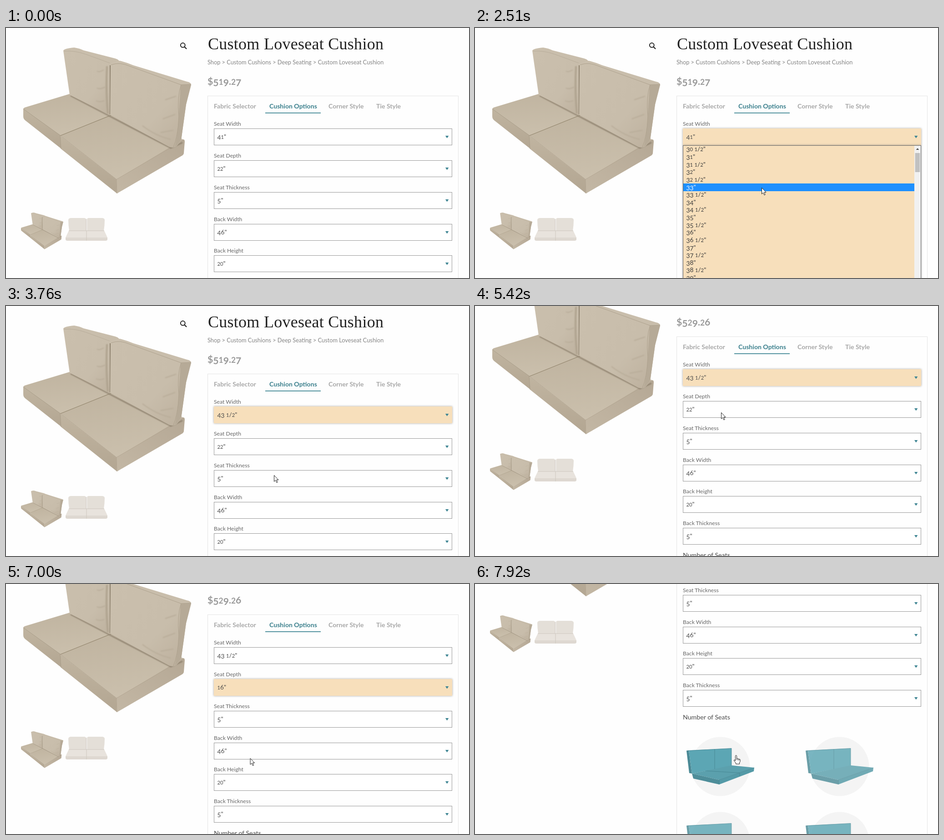
An HTML page that plays this animation: 1018x550 px, repeating every 7.99 s.

```html
<!DOCTYPE html>
<html lang="en">
<head>
<meta charset="utf-8">
<title>Custom Loveseat Cushion</title>
<style>
  html, body { margin: 0; width: 100%; height: 100%; overflow: hidden; background: #fefefe; }
  svg { display: block; }
  text { font-family: Lato, "Open Sans", sans-serif; fill: #4a4a4a; white-space: pre; }
  .title { font: 36px "Liberation Serif", "Times New Roman", serif; letter-spacing: .27px; fill: #222; }
  .crumb { font-size: 12.75px; fill: #858585; }
  .price { font-size: 21.2px; font-weight: 700; fill: #999; }
  .tab { font-size: 14.1px; font-weight: 700; fill: #a8a8a8; }
  .tab.on { fill: #3a7f8c; }
  .label { font-size: 12.2px; fill: #666; }
  .head { font-size: 14.2px; }
  .value, .row { font-size: 13.7px; }
  .row { fill: #3a3a3a; }
  .row.on { fill: #fff; }
  .low { font-size: .82em; }
  .drop { baseline-shift: -.15em; }
  .glow { filter: drop-shadow(0 0 2px #777a); }
  .soft { filter: blur(1.2px); }
</style>
</head>
<body>
<svg id="stage" width="1018" height="550" viewBox="0 0 1018 550">
  <defs>
    <linearGradient id="back" x1="0" y1="0" x2="1" y2="1">
      <stop offset="0" stop-color="#cabfad"/><stop offset=".6" stop-color="#c8bdab"/><stop offset="1" stop-color="#bbae9b"/>
    </linearGradient>
    <linearGradient id="seat" x1="0" y1="0" x2=".3" y2="1">
      <stop offset="0" stop-color="#bfb39f"/><stop offset="1" stop-color="#cabfac"/>
    </linearGradient>
    <linearGradient id="edge" x1="0" y1="0" x2="0" y2="1">
      <stop offset="0" stop-color="#c0b4a0"/><stop offset="1" stop-color="#b3a692"/>
    </linearGradient>
    <linearGradient id="front" x1="0" y1="1" x2="1" y2="0">
      <stop offset="0" stop-color="#c3b7a4"/><stop offset="1" stop-color="#b5a895"/>
    </linearGradient>
  </defs>
  <g id="page"></g>
  <g id="arrow"><path d="M.5.5V14.2L3.7 11.3 6 16.6 8.1 15.7 5.9 10.5H10Z" fill="#fff" stroke="#222" stroke-linejoin="round"/></g>
  <g id="hand"><path d="M-1.5 12V1.6Q-1.5 0 0 0T1.5 1.6V7Q3.4 5.8 4.3 7.6 6 6.6 6.8 8.3 9 7.8 9 10V13.5L7.6 16V19H-.3V17L-4.6 11.6Q-4.8 9.2-2.6 10.2Z" fill="#fff" stroke="#222" stroke-linejoin="round"/><path d="M1.5 7V10M4.3 8V11M6.8 8.5V11" fill="none" stroke="#222"/></g>
</svg>
<script>
const LOOP = 7990, PITCH = 69.85, ROW = 16.62;
const $ = id => document.getElementById(id);
const boxTop = i => Math.round(222 + PITCH * i) - .5;
const size = v => Math.floor(v) + (v % 1 ? ' 1/2' : '') + '"';

// old-style figures: 0-2 small, 3 4 5 7 9 below the line
const figures = s => s.replace(/[0-579]/g, d =>
  `<tspan class="${d < 3 ? 'low' : 'drop'}">${d}</tspan>`);
const text = (x, y, cls, s, id = '') =>
  `<text x="${x}" y="${y}" class="${cls}" id="${id}">${figures(s)}</text>`;
const rect = (x, y, w, h, fill, more = '') =>
  `<rect x="${x}" y="${y}" width="${w}" height="${h}" fill="${fill}" ${more}/>`;
const path = (d, fill, more = '') => `<path d="${d}" fill="${fill}" ${more}/>`;
const line = (d, color, w = 1, cls = '') =>
  path(d, 'none', `stroke="${color}" stroke-width="${w}" class="${cls}"`);

function sofa() {
  return '<g id="sofa" stroke-linejoin="round">' +
    path('M38 178Q39 175 44 174L140 145 235 192 119 238Z', 'url(#seat)') +
    path('M38 178L119 236 122 266 42 203Q38 200 38 194Z', 'url(#edge)') +
    path('M119 237L229 191 392 246 243 333Z', 'url(#seat)') +
    path('M119 237L243 333 244 364 121 266Z', 'url(#edge)') +
    path('M243 333L386 247Q393 243 393 250L391 275Q391 279 385 282L244 364Z', 'url(#front)') +
    line('M119 237L231 192', '#94876f', 1.3) +
    line('M38 178L119 236 121 266', '#a99d89') +
    line('M121 238L243 333 390 247M243 333L244 364', '#b2a591') +
    line('M142 149L228 194 362 264 388 252', '#8d806d', 2.5, 'soft') +
    path('M126 50Q127 45 150 43 163 45 170 49L240 67Q251 70 248 76L231 90 228 191 140 147Z', 'url(#back)') +
    line('M128 51Q150 49 176 58L228 77', '#b8ad9a') +
    line('M222 84Q219 140 224 188', '#b0a490', 4, 'soft') +
    line('M229 82V190', '#8b7f6b', 2) +
    path('M230 82Q232 74 250 72 266 76 280 82L398 118Q408 120 407 126L396 168 386 240Q386 248 383 251L374 261Q366 265 358 261L229 191Z', 'url(#back)') +
    path('M384 125L407 124 396 168 386 240Q386 248 371 262 378 235 380 190Z', '#b6aa97') +
    line('M231 81Q250 74 272 84L385 125 407 124M385 125Q376 150 380 195 378 240 368 262', '#aea28e') +
    line('M215 92Q205 98 200 95M218 130Q205 136 200 132M216 160Q205 164 198 160M374 150L350 158M372 190L345 200M368 225L340 230M300 215Q330 238 362 245', '#b8ac99', 2, 'soft') +
    '</g>';
}

function paleSofa() {
  const half = path('M137 422Q138 418 143 418L172 418Q176 418 176 422V446H139Q137 434 137 422Z', '#e4dfd8') +
    path('M138 446H177V461H131Z', '#e8e3dd') +
    path('M131 461H177V468H135Q131 468 131 465Z', '#ded8d1');
  return half + `<g transform="matrix(-1 0 0 1 354 0)">${half}</g>` +
    line('M177 446V468M138 446H216M176.5 420V446', '#cdc6be');
}

// one choice of seat layout, drawn around its round backdrop
function choice(n) {
  const x = n % 2 * 262, y = 337 + (n >> 1) * 165;
  const seam = '#3f7f8b';
  return `<g transform="translate(${x} ${y})"><circle cx="539.5" cy="401.5" r="65" fill="#f4f4f4"/>` +
    `<g id="choice${n}" opacity=".82" stroke-linejoin="round">` +
    path('M465 367L470 366 477 417 471 416Z', '#4a8995') +
    path('M470 366L564 361.5V400L477 417Z', '#5ca6b4') +
    path('M477 417L564 399 614 404 537 431Z', '#5ba0ad') +
    path('M477 417L537 431V441L480 428Z', '#4d8d99') +
    path('M537 431L614 404 613 412 537 441Z', '#549aa7') +
    line('M465 367L564 361.5V399M537 431L614 404M537 431V441', seam, .7) +
    (n < 2 ? line('M527 363.5V407', seam, .7) : '') +
    (n === 0 ? line('M507 411L582 415.5V423', seam, .7) : '') + '</g></g>';
}

const fields = [['Seat Width', '41"'], ['Seat Depth', '22"'], ['Seat Thickness', '5"'],
  ['Back Width', '46"'], ['Back Height', '20"'], ['Back Thickness', '5"']];

function field([name, value], i) {
  const y = boxTop(i);
  return text(457, y - 7, 'label', name) +
    rect(457.5, y, 523, 36, '#fff', 'stroke="#999"') +
    `<g id="focus${i}" class="glow" opacity="0">` + rect(457, y - .5, 524, 37, '#f7dfbb') + '</g>' +
    text(464.5, y + 22.8, 'value', value, 'value' + i) +
    path(`M966 ${y + 15.5}h7.4l-3.7 5.6z`, '#3e8593');
}

// list: field index, first value, count, thumb height, thumb travel per row
const lists = [
  { i: 0, first: 30, count: 46, thumb: 42, step: 2, caret: '#444' },
  { i: 1, first: 12, count: 24, thumb: 124, step: 6, caret: '#aaa' }];

function popup({ i, first, count, thumb, caret }) {
  const y = boxTop(i) + 37, h = ROW * 22;
  let rows = '';
  for (let k = 0; k < count; k++)
    rows += text(6.5, k * ROW + 12.5, 'row', size(first + k / 2));
  return `<g id="list${i}" opacity="0">` +
    rect(457.5, y, 523, h + 1, '#f7dfbb', 'stroke="#666" class="glow"') +
    `<svg x="458" y="${y + .5}" width="508" height="${h}"><g id="rows${i}">` +
    rect(0, 0, 508, ROW, '#1e90ff', `id="mark${i}" shape-rendering="crispEdges"`) + rows + '</g></svg>' +
    rect(966, y + .5, 14, h, '#f1f1f1') +
    path(`M969.7 ${y + 9.5}l3.3-3.6 3.3 3.6z`, caret) +
    rect(967.7, y + 14.5, 10.6, thumb, '#c1c1c1', `id="thumb${i}"`) + '</g>';
}

$('page').innerHTML =
  sofa() + '<use href="#sofa" transform="translate(23.4 395.2) scale(.2515)"/>' + paleSofa() +
  '<circle cx="388.8" cy="37.8" r="4.9" fill="none" stroke="#111" stroke-width="1.8"/>' +
  line('M392.4 41.4L397 46', '#111', 2) +
  text(444, 47, 'title', 'Custom Loveseat Cushion') +
  text(443, 80.2, 'crumb', 'Shop &gt; Custom Cushions &gt; Deep Seating &gt; Custom Loveseat Cushion') +
  text(443, 124.6, 'price', '$519.27', 'price') +
  rect(443.5, 149.5, 551, 1100, 'none', 'stroke="#e5e5e5"') +
  text(457, 177, 'tab', 'Fabric Selector') + text(579, 177, 'tab on', 'Cushion Options') +
  text(709, 177, 'tab', 'Corner Style') + text(814, 177, 'tab', 'Tie Style') +
  rect(570, 186, 122, 1.7, '#3a8391') +
  fields.map(field).join('') + text(457, 635.4, 'head', 'Number of Seats') +
  [0, 1, 2, 3].map(choice).join('') + lists.map(popup).join('');

// tables of [time, values...], eased between neighbours
const pointer = [[200, 821, 505], [990, 646, 255], [1040, 646, 255], [1260, 623.5, 231.5], [2320, 623.5, 231.5],
  [2510, 630, 351], [3170, 589, 372], [4890, 589, 372], [5420, 541, 234], [5680, 525, 231], [6140, 525, 231],
  [6400, 521, 312.7], [6600, 519, 384], [6800, 519, 384], [7330, 573.5, 381], [7660, 573.5, 381], [7790, 574, 377]];
const scroll = [[4950, 0], [5210, 82], [7060, 82], [7300, 170], [7360, 170], [7520, 253], [7630, 253], [7800, 337]];
const wheel = [[2580, 1], [3100, 21]];
const focus = [
  [[1700, 0], [1850, 1], [5620, 1], [5700, 0]],
  [[5620, 0], [5740, 1]]];
const open = [
  [[1760, 0], [1920, 1], [3610, 1], [3710, 0]],
  [[5800, 0], [5940, 1], [6700, 1], [6790, 0]]];
const hover = [[7790, .82], [7900, 1]];

function at(table, t) {
  const n = table.findIndex(r => r[0] > t);
  if (n === 0) return table[0].slice(1);
  if (n < 0) return table[table.length - 1].slice(1);
  const a = table[n - 1], b = table[n], p = (t - a[0]) / (b[0] - a[0]), e = p * p * (3 - 2 * p);
  return a.slice(1).map((v, k) => v + (b[k + 1] - v) * e);
}

const set = (id, name, v) => $(id).setAttribute(name, v);
const shown = {};
function write(id, s) {
  if (shown[id] !== s) $(id).innerHTML = figures(shown[id] = s);
}

function drawList({ i, step }, t, y) {
  const [alpha] = at(open[i], t);
  set('list' + i, 'opacity', alpha);
  set('list' + i, 'visibility', alpha ? 'visible' : 'hidden');
  if (!alpha) return;
  const off = i ? 0 : Math.round(at(wheel, t)[0]);
  const row = Math.floor((y - boxTop(i) - 37.5) / ROW);
  const k = row < 0 ? -1 : row + off;
  set('rows' + i, 'transform', `translate(0 ${-off * ROW})`);
  set('mark' + i, 'y', k < 0 ? -99 : k * ROW);
  set('thumb' + i, 'transform', `translate(0 ${off * step})`);
  $('rows' + i).querySelectorAll('text').forEach((el, n) => el.classList.toggle('on', n === k));
}

function draw(t) {
  const [x, y] = at(pointer, t), [top] = at(scroll, t), link = t >= 7780;
  set('page', 'transform', `translate(0 ${-top})`);
  for (const id of ['arrow', 'hand']) {
    set(id, 'transform', `translate(${x} ${y})`);
    set(id, 'visibility', t >= 200 && link === (id === 'hand') ? 'visible' : 'hidden');
  }
  focus.forEach((f, i) => set('focus' + i, 'opacity', at(f, t)[0]));
  lists.forEach(l => drawList(l, t, y + top));
  set('choice0', 'opacity', at(hover, t)[0]);
  write('value0', t < 3630 ? '41"' : '43 1/2"');
  write('value1', t < 6730 ? '22"' : '16"');
  write('price', t < 4290 ? '$519.27' : '$529.26');
}

const start = performance.now();
function tick() {
  draw((performance.now() - start) % LOOP);
  requestAnimationFrame(tick);
}
draw(0);
requestAnimationFrame(tick);
</script>
</body>
</html>
```
